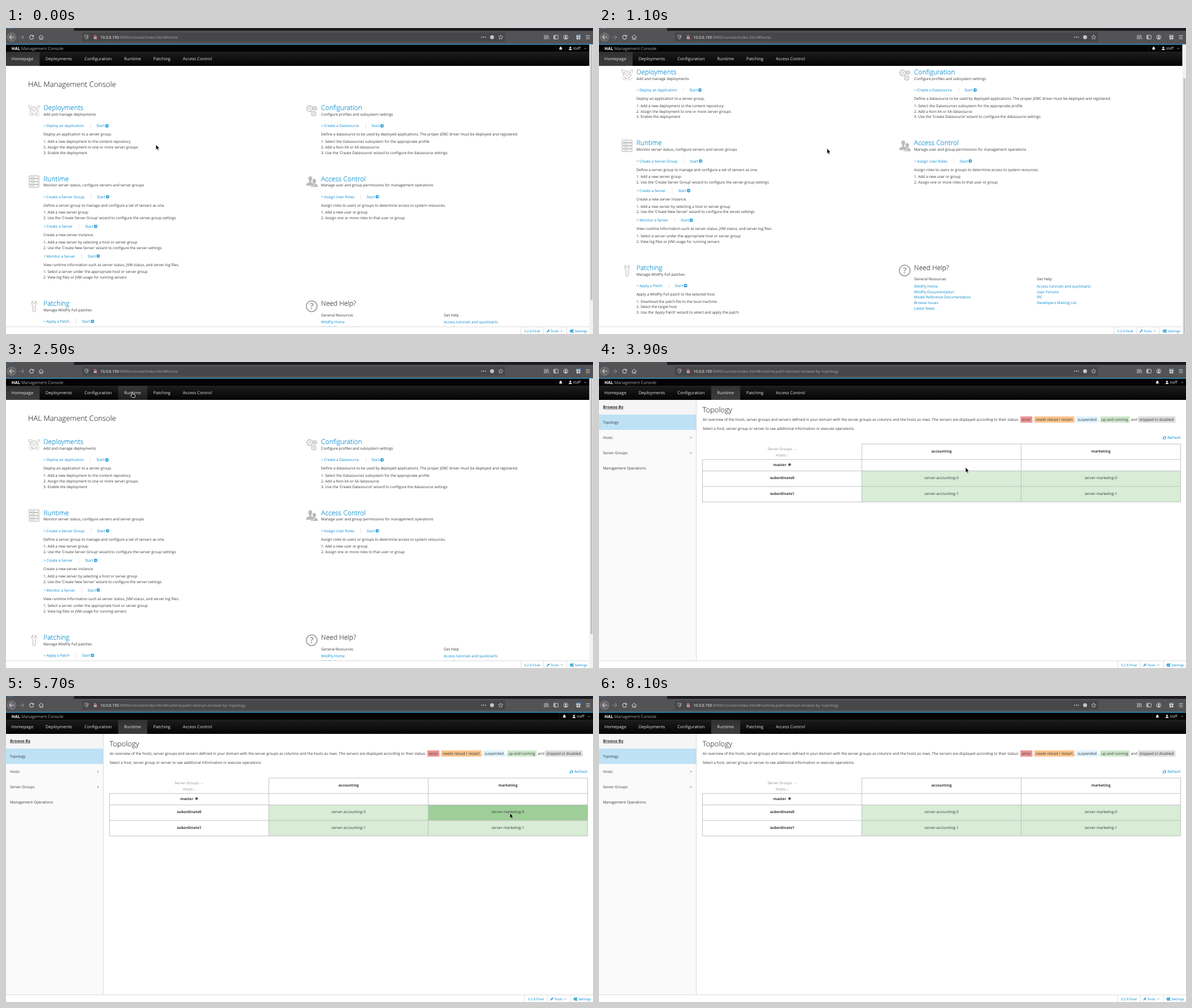
Write an HTML page that moves like this. It is 1035 by 541 pixels and loops after 8.5 s.

```html
<!DOCTYPE html>
<html lang="en">
<head>
<meta charset="utf-8">
<title>HAL Management Console</title>
<style>
  html, body { margin: 0; width: 100%; height: 100%; overflow: hidden; background: #fff; }
  svg { display: block; }
  text { font-family: "Open Sans", sans-serif; text-rendering: geometricPrecision; white-space: pre; }
</style>
</head>
<body>
<svg id="stage" width="1035" height="541" viewBox="0 0 1035 541"></svg>
<script>
const BODY = 6.515, SMALL = 5.95, NAV = 7.55, H1 = 13, H2 = 11.9;
const INK = '#363636', LINK = '#0088ce', GREY = '#a9a9a9', RULE = '#bbb', PALE = '#d7d7db', TOOLBAR = '#535355';

// Text is placed by its left edge (or anchor) and the middle of its capitals.
const text = (x, y, s, { size = BODY, fill = INK, weight = 400, anchor = 'start', more = '' } = {}) =>
  `<text x="${x}" y="${(y + size * .36).toFixed(2)}" font-size="${size}" fill="${fill}" font-weight="${weight}" text-anchor="${anchor}" ${more}>${s}</text>`;
const rect = (x, y, w, h, fill, more = '') =>
  `<rect x="${x}" y="${y}" width="${w}" height="${h}" fill="${fill}" ${more}/>`;
const line = (d, stroke, w = .8, more = '') =>
  `<path d="${d}" fill="none" stroke="${stroke}" stroke-width="${w}" ${more}/>`;
const shape = (d, fill, more = '') => `<path d="${d}" fill="${fill}" ${more}/>`;
const ring = (x, y, r, stroke, w = .8, more = '') =>
  `<circle cx="${x}" cy="${y}" r="${r}" fill="none" stroke="${stroke}" stroke-width="${w}" ${more}/>`;
const dot = (x, y, r, fill) => `<circle cx="${x}" cy="${y}" r="${r}" fill="${fill}"/>`;
const group = (id, body, more = '') => `<g id="${id}" ${more}>${body}</g>`;
const at = (x, y, body) => `<g transform="translate(${x} ${y})">${body}</g>`;
const title = (x, y, s, size, fill = INK) =>
  text(x, y, s, { size, fill, weight: 300, more: `stroke="${fill}" stroke-width=".14"` });
const gear = (x, y, r, c, w = .8) => ring(x, y, r, c, w) + ring(x, y, r * .4, c, w) +
  ring(x, y, r + w, c, w * 1.6, 'pathLength="16" stroke-dasharray="1"');
const star = (x, y, r) => {
  const p = Array.from({ length: 10 }, (_, i) => {
    const a = i * Math.PI / 5, q = i % 2 ? r * .42 : r;
    return `${(x + q * Math.sin(a)).toFixed(2)},${(y - q * Math.cos(a)).toFixed(2)}`;
  });
  return `M${p.join('L')}Z`;
};
const wrench = k => `<g transform="scale(${k})">` +
  '<path d="M-2.2-9.5V-5.6L0-4.4L2.2-5.6V-9.5Q5-7.6 4.4-4.4Q3.8-2.4 2-1.4V8Q2 10 0 10Q-2 10-2 8V-1.4Q-3.8-2.4-4.4-4.4Q-5-7.6-2.2-9.5Z"/></g>';
const chevDown = (x, y, c) => line(`M${x - 1.5} ${y - .8}l1.5 1.6l1.5-1.6`, c, .75);
const chevRight = (x, y, c) => line(`M${x - .7} ${y - 1.6}l1.6 1.6l-1.6 1.6`, c, .75);
const chevUp = (x, y, c) => line(`M${x - 1.5} ${y + .8}l1.5-1.6l1.5 1.6`, c, .75);

/* Home page */
const task = (x, y, label, startX, open, desc, steps) =>
  (open ? chevDown : chevRight)(x + 2, y, LINK) +
  text(x + 5.2, y, label, { fill: LINK }) +
  rect(startX - 10.7, y - 4.5, .6, 9, '#d1d1d1') +
  text(startX, y, 'Start', { fill: LINK }) +
  dot(startX + 18.6, y - .2, 2.9, LINK) +
  line(`M${startX + 16.7} ${y - .2}h3.2M${startX + 18.5} ${y - 2}l1.8 1.8l-1.8 1.8`, '#fff', .95) +
  text(x, y + 15, desc) +
  steps.map((s, i) => text(x, y + 27.6 + i * 9.75, `${i + 1}. ${s}`)).join('');
const head = (x, y, name, sub) => title(x, y, name, H2, LINK) + text(x, y + 11.7, sub);
const links = (x, list) => list.map((s, i) => text(x, 519.6 + i * 9.8, s, { fill: LINK })).join('');

const deployIcon = at(49.5, 146, ring(0, 0, 6.8, GREY, .8) +
  line('M-10-8.5L-5.5-9L-3.5-6.5M-10-8.5L-9-4L-6.5-3M10-8.5L5.5-8M10-8.5L9.5-4M-9.5 4L-6 9L-1 7.5M9.5 4L6.5 9.5L2 8M-8-7L5 6M8-7L-5 6M-6.5 2L0-5L6.5 2', GREY, .7));
const configIcon = gear(535.5, 142.5, 4.7, GREY) + gear(545, 142, 2.7, GREY, .7) + gear(542.5, 151.5, 3.6, GREY, .7);
const serverIcon = [0, 1, 2, 3].map(i =>
  rect(40.7, 261.2 + i * 5.3, 17.6, 4.6, '#fff', `rx=".8" stroke="${GREY}" stroke-width=".9"`) +
  line(`M43 ${263.5 + i * 5.3}h8M54.5 ${263.5 + i * 5.3}h2`, GREY, .7)).join('');
const person = 'M0-9Q3.8-9 3.8-4.8Q3.6-1.6 2 0V1.6Q7 3 7.5 5.5V8.5H-7.5V5.5Q-7 3-2 1.6V0Q-3.6-1.6-3.8-4.8Q-3.8-9 0-9Z';
const peopleIcon = at(543.5, 274.2, `<g transform="scale(.8)">${shape(person, '#b4b4b4')}</g>`) +
  at(536.5, 270.8, shape(person, '#bcbcbc', 'stroke="#fff" stroke-width=".8"'));
const helpIcon = ring(539, 492, 9.5, GREY, 2) +
  text(539, 492, '?', { size: 15, fill: GREY, weight: 700, anchor: 'middle' });

const home =
  title(39, 99, 'HAL Management Console', H1) +
  deployIcon + head(66, 141.2, 'Deployments', 'Add and manage deployments') +
  task(66, 173.1, 'Deploy an Application', 159.4, true, 'Deploy an application to a server group.',
    ['Add a new deployment to the content repository', 'Assign the deployment to one or more server groups', 'Enable the deployment']) +
  configIcon + head(555.6, 141.2, 'Configuration', 'Configure profiles and subsystem settings') +
  task(555.6, 173.1, 'Create a Datasource', 644.5, true,
    'Define a datasource to be used by deployed applications. The proper JDBC driver must be deployed and registered.',
    ['Select the Datasources subsystem for the appropriate profile', 'Add a Non-XA or XA datasource', "Use the 'Create Datasource' wizard to configure the datasource settings"]) +
  serverIcon + head(66, 266.4, 'Runtime', 'Monitor server status, configure servers and server groups') +
  task(66, 298.5, 'Create a Server Group', 160.6, true, 'Define a server group to manage and configure a set of servers as one.',
    ['Add a new server group', "Use the 'Create Server Group' wizard to configure the server group settings"]) +
  task(66, 350.9, 'Create a Server', 139.5, false, 'Create a new server instance.',
    ['Add a new server by selecting a host or server group', "Use the 'Create New Server' wizard to configure the server settings"]) +
  task(66, 403.3, 'Monitor a Server', 144, false, 'View runtime information such as server status, JVM status, and server log files.',
    ['Select a server under the appropriate host or server group', 'View log files or JVM usage for running servers']) +
  peopleIcon + head(555.6, 266.4, 'Access Control', 'Manage user and group permissions for management operations') +
  task(555.6, 298.5, 'Assign User Roles', 636, true, 'Assign roles to users or groups to determine access to system resources.',
    ['Add a new user or group', 'Assign one or more roles to that user or group']) +
  at(49.5, 492, `<g fill="none" stroke="${GREY}" stroke-width=".9">${wrench(1)}</g>`) +
  head(66, 486.7, 'Patching', 'Manage WildFly Full patches') +
  task(66, 518.8, 'Apply a Patch', 134, true, 'Apply a WildFly Full patch to the selected host.',
    ['Download the patch file to the local machine', 'Select the target host', "Use the 'Apply Patch' wizard to select and apply the patch"]) +
  helpIcon + title(555.6, 486.7, 'Need Help?', H2) +
  text(555.6, 507.3, 'General Resources') + text(772, 507.3, 'Get Help') +
  links(555.6, ['WildFly Home', 'WildFly Documentation', 'Model Reference Documentation', 'Browse Issues', 'Latest News']) +
  links(772, ['Access tutorials and quickstarts', 'User Forums', 'IRC', 'Developers Mailing List']);

/* Topology page */
const COLS = [182.5, 463.4, 744.4, 1025.5], ROWS = [145, 172.4, 192.6, 220, 247.4];
const mid = i => (COLS[i] + COLS[i + 1]) / 2;
const pill = (x, w, fill, tx, s) => rect(x, 96.2, w, 11, fill) + text(tx, 101.8, s);
const bold = { weight: 700, anchor: 'middle' }, centre = { anchor: 'middle' };
const soft = { anchor: 'middle', fill: '#8b8d8f' };

const side = rect(0, 67, 171.5, 461, '#fafafa') + rect(0, 67, 171.5, 26, '#f5f5f5') +
  rect(0, 93, 171.5, 27, '#bee1f4') + rect(171.2, 67, .8, 461, '#d1d1d1') +
  text(7, 79.2, 'Browse By', { size: 7, weight: 700, more: 'text-decoration="underline"' }) +
  ['Topology', 'Hosts', 'Server Groups', 'Management Operations'].map((s, i) => text(7, 106.5 + i * 27, s)).join('') +
  chevRight(162, 133.7, INK) + chevRight(162, 160.7, INK);

const legend =
  text(182.7, 101.8, 'An overview of the hosts, server groups and servers defined in your domain with the server groups as columns and the hosts as rows. The servers are displayed according to their status:', { size: 6.49 }) +
  pill(743, 21, '#ec9393', 746, 'error') + text(764.6, 101.8, ',') +
  pill(767.6, 70.6, '#f8c48c', 770, 'needs reload / restart') + text(838.6, 101.8, ',') +
  pill(841.6, 38.2, '#def3ff', 844, 'suspended') + text(880.4, 101.8, ',') +
  pill(883.6, 52, '#cfe7cd', 886, 'up and running') + text(937.4, 101.8, 'and') +
  pill(950.3, 66, '#dcdcdc', 953, 'stopped or disabled') + text(1016.8, 101.8, '.') +
  text(182.7, 118, 'Select a host, server group or server to see additional information or execute operations.');

const refresh = (x, y, r, c, w) =>
  line(`M${x - r} ${y - .3}A${r} ${r} 0 0 1 ${x + r * .8} ${y - r * .6}M${x + r} ${y + .3}A${r} ${r} 0 0 1 ${x - r * .8} ${y + r * .6}`, c, w) +
  shape(`M${x + r + .4} ${y - r}v2.4h-2.4zM${x - r - .4} ${y + r}v-2.4h2.4z`, c);

const table = rect(COLS[1], ROWS[2], COLS[3] - COLS[1], ROWS[4] - ROWS[2], '#d8ecd6') +
  rect(0, 0, 281, 27.4, '#9ecf99', 'id="cell"') +
  line(`M${COLS[1]} ${ROWS[0]}H${COLS[3]}` + ROWS.slice(1).map(y => `M${COLS[0]} ${y}H${COLS[3]}`).join('') +
    `M${COLS[0]} ${ROWS[1]}V${ROWS[4]}` + COLS.slice(1).map(x => `M${x} ${ROWS[0]}V${ROWS[4]}`).join(''), RULE, .9) +
  text(mid(0), 154, 'Server Groups →', soft) + text(mid(0), 164.5, 'Hosts ↓', soft) +
  text(307, 181.3, 'master', { weight: 700 }) + shape(star(336, 181.4, 3.4), INK) +
  ['accounting', 'marketing'].map((g, i) => text(mid(i + 1), 157.4, g, bold) +
    [0, 1].map(n => text(mid(i + 1), 205 + n * 27.4, `server-${g}-${n}`, centre)).join('')).join('') +
  [0, 1].map(n => text(mid(0), 205 + n * 27.4, `subordinate${n}`, bold)).join('');

const topology = rect(0, 67, 1035, 461, '#fff') + side + title(182.5, 84, 'Topology', H1) + legend +
  refresh(997, 134, 2.4, LINK, .9) + text(1002.3, 134, 'Refresh', { fill: LINK }) + table;

/* Browser bar */
const stroke = (d, c = PALE, w = .9) => line(d, c, w, 'stroke-linecap="round" stroke-linejoin="round"');
const url = { size: 6.81, fill: '#a3a3a6', more: 'style="font-family:\'Noto Sans\',sans-serif"' };
const address = s => text(166.3, 16.2, `<tspan fill="#f9f9fa">10.0.0.193</tspan>:9990/console/index.html#${s}`, url);
const bar = rect(0, 0, 1035, 6, '#1c1b1f') + rect(0, 0, 120, 6, TOOLBAR) + rect(4, 0, 8, 1, '#2f7cc0') +
  rect(0, 5, 1035, 23.5, TOOLBAR) + rect(134.3, 8, 746, 16.3, '#474749', 'rx="1.5"') +
  `<circle cx="10" cy="16.2" r="7.8" fill="#68686b" stroke="#8c8c8f" stroke-width=".6"/>` +
  stroke('M14 16.2H6.4M9.6 12.9L6.3 16.2L9.6 19.5', PALE, 1.1) +
  stroke('M23.8 16.2H31.4M28.2 12.9L31.5 16.2L28.2 19.5', '#87878a', 1.1) +
  stroke('M48 14.4A3.5 3.5 0 1 0 48.5 17.2', PALE, 1.1) + shape('M49.2 12v3.4h-3.4z', PALE) +
  stroke('M58 16.4L62 12.4L66 16.4M59.3 16V19.9H64.7V16M62 19.8V17.6', PALE, 1) +
  stroke('M142 12.4L145.2 13.4Q145.2 18.2 142 20Q138.8 18.2 138.8 13.4Z', '#b8b8bb') + shape('M142 14v4.4q1.6-1.4 1.6-4z', '#b8b8bb') +
  rect(155, 15.6, 5, 3.9, '#b8b8bb', 'rx=".5"') + stroke('M156 15.4V14Q157.5 11.6 159 14V15.4', '#b8b8bb') + stroke('M154.3 12.6L160.8 19.8', '#ff3b55', 1) +
  [838.8, 842, 845.2].map(x => dot(x, 16.2, 1, '#c4c4c6')).join('') +
  dot(857, 16.2, 3.5, '#c4c4c6') +
  `<path d="${star(872.2, 16.4, 4.3)}" fill="none" stroke="#c4c4c6" stroke-width=".8"/>` +
  stroke('M949.3 12.8V19.6M951.5 12.8V19.6M953.7 12.8V19.6M955.4 13L957 19.6') +
  rect(965.7, 12.9, 7.8, 6.6, 'none', `rx=".9" stroke="${PALE}" stroke-width=".9"`) + rect(966, 13.2, 3, 6, PALE, 'opacity=".65"') +
  ring(987, 16.2, 3.8, PALE, .9) + dot(987, 15.2, 1.5, PALE) + shape('M984.4 18.6q2.6-2.8 5.2 0q-2.6 2-5.2 0z', PALE) +
  rect(1005.4, 13.8, 7.6, 2.2, PALE) + rect(1006, 16.6, 6.4, 3.6, PALE) + rect(1008.8, 13.8, .9, 6.4, TOOLBAR) +
  stroke('M1009.2 13.6Q1006.5 10.6 1006.4 13.2M1009.2 13.6Q1011.8 10.6 1012 13.2') + dot(1012.6, 12.4, 1.3, '#0a84ff') +
  stroke('M1023 13.4h6M1023 16.2h6M1023 19h6') +
  group('urlHome', address('home')) + group('urlTopo', address('runtime;path=domain-browse-by~topology'));

/* Console header and footer */
const TABS = [0, 59.3, 128, 197.8, 249, 301, 375];
const NAMES = ['Homepage', 'Deployments', 'Configuration', 'Runtime', 'Patching', 'Access Control'];
const NAMEX = [9.6, 69.8, 138.3, 208.3, 259.7, 311.7];
const tab = (id, fill) => rect(0, 42.2, 10, 24.8, fill, `id="${id}"`);
const header = rect(0, 28, 1035, 14.2, '#030303') + rect(0, 28.1, 1035, 1.4, '#39a5dc') +
  rect(0, 42, 1035, 25, 'url(#nav)') + rect(0, 42, 1035, .5, '#2b2b2b') +
  tab('hover', 'url(#glow)') + tab('active', 'url(#lit)') +
  text(9.8, 36, 'HAL', { size: NAV, fill: '#fff', weight: 700 }) +
  text(27, 36, 'Management Console', { size: NAV, fill: '#fff', weight: 300 }) +
  NAMES.map((s, i) => text(NAMEX[i], 54.6, s, { size: NAV, fill: '#e4e4e4' })).join('') +
  group('user', rect(969, 30, .5, 12, '#2b2b2b') + rect(986.3, 30, .5, 12, '#2b2b2b') +
    shape('M978 33q2 .2 2 2.8q.2 1.6 1 2.2h-6q.8-.6 1-2.2q0-2.6 2-2.8zM977.2 38.4h1.6q-.8 1.2-1.6 0z', '#e4e4e4') +
    dot(995, 34.6, 1.6, '#e4e4e4') + shape('M992.2 39q0-2.6 2.8-2.6t2.8 2.6z', '#e4e4e4') +
    text(999.8, 36.1, 'staff', { fill: '#e4e4e4' }) + chevDown(1021.3, 36.3, '#e4e4e4'));
const foot = { size: SMALL, fill: LINK };
const footer = rect(0, 528, 1035, 13, '#fff') + rect(0, 527.8, 1035, .8, '#d1d1d1') +
  group('tools', [907.5, 947.5, 988.3].map(x => rect(x, 528.5, .7, 13, '#d1d1d1')).join('') +
    text(913.5, 535.6, '3.2.9.Final', foot) +
    at(956, 535.6, `<g fill="${LINK}" transform="rotate(45)">${wrench(.33)}</g>`) +
    text(960.2, 535.6, 'Tools', foot) + chevUp(979.8, 535.6, LINK) +
    gear(996.6, 535.8, 1.5, LINK, .8) + gear(999.6, 534, .7, LINK, .5) + gear(999.6, 537.6, .7, LINK, .5) +
    text(1003, 535.6, 'Settings', foot));

const edge = 'fill="#000" stroke="#fff" stroke-linejoin="round"';
const arrow = `<path id="arrow" ${edge} stroke-width=".6" d="M0 0V9.2L2.1 7.3L3.5 10.4L5 9.8L3.7 6.7H6.3Z"/>`;
const hand = `<path id="hand" ${edge} stroke-width=".9" d="M-.9.8Q0-.7.9.8V3.8L4.6 4.6Q5.7 5 5.5 6.2L4.8 9.6H.2L-2.6 6.3Q-2.4 5-.9 6Z"/>`;
const fade = (id, top, bottom) =>
  `<linearGradient id="${id}" x2="0" y2="1"><stop stop-color="${top}"/><stop offset="1" stop-color="${bottom}"/></linearGradient>`;

document.getElementById('stage').innerHTML =
  `<defs>${fade('nav', '#1d1d1d', '#030303')}${fade('lit', '#323232', '#3c3c3c')}${fade('glow', '#363636', '#1d1d1d')}</defs>` +
  rect(0, 0, 1035, 541, '#fff') + group('home', home) + group('topology', topology) + bar + header + footer +
  group('scrollbar', rect(1028.5, 29.2, 6.5, 511.8, '#f2f2f2') + rect(1030.4, 29.2, 3.8, 452, '#c4c4c4', 'id="thumb"')) +
  group('cursor', arrow + hand);

/* Motion: [ms, x, y] for the pointer, [ms, y] for the page */
const POINTER = [
  [0, 264.3, 206], [300, 264.3, 206], [900, 396, 211], [1100, 402, 213], [1200, 403, 214],
  [1500, 390, 190], [2100, 160, 50], [2500, 222.3, 53], [3200, 222.3, 53], [3900, 646.3, 186.3],
  [4000, 342, 207], [4200, 342, 207], [4700, 604, 209], [4800, 604, 209], [5100, 614, 238],
  [5500, 888, 238], [5600, 888, 238], [5700, 888.5, 207], [5800, 888.5, 207], [6500, 560.4, 246],
  [6600, 470, 253], [6700, 386, 240], [7300, 185, 56], [7600, 160, 53], [8000, 46, 0]
];
const SCROLL = [[0, 0], [600, 0], [800, 40], [1000, 63.2], [1200, 63.2], [1400, 23], [1600, 0]];
const LOOP = 8500, TICK = 100, OPEN = 3200, GONE = 8100;

const tween = (keys, t) => {
  const i = keys.findIndex(k => k[0] > t);
  if (i < 0) return keys[keys.length - 1].slice(1);
  const a = keys[i - 1], b = keys[i], f = (t - a[0]) / (b[0] - a[0]);
  return a.slice(1).map((v, j) => v + (b[j + 1] - v) * f);
};
const el = id => document.getElementById(id);
const show = (id, on) => el(id).setAttribute('display', on ? 'inline' : 'none');
const move = (id, x, y) => el(id).setAttribute('transform', `translate(${x} ${y})`);
const setTab = (id, i) => {
  show(id, i >= 0);
  if (i < 0) return;
  el(id).setAttribute('x', TABS[i]);
  el(id).setAttribute('width', TABS[i + 1] - TABS[i]);
};

function draw(t) {
  const topo = t >= OPEN, seen = t < GONE;
  const [x, y] = tween(POINTER, t), [scroll] = tween(SCROLL, t);
  ['home', 'urlHome', 'scrollbar'].forEach(id => show(id, !topo));
  ['topology', 'urlTopo'].forEach(id => show(id, topo));
  move('home', 0, -scroll);
  move('thumb', 0, scroll * .945);
  move('user', topo ? 6.5 : 0, 0);
  move('tools', topo ? 6.5 : 0, 0);

  const overNav = seen && y > 42 && y < 67 && x < 375;
  setTab('active', topo ? 3 : 0);
  setTab('hover', overNav ? TABS.findIndex(v => v > x) - 1 : -1);
  const overCell = seen && x > COLS[1] && x < COLS[3] && y > ROWS[2] && y < ROWS[4];
  show('cell', overCell);
  if (overCell) move('cell', COLS[x < COLS[2] ? 1 : 2], ROWS[y < ROWS[3] ? 2 : 3]);

  show('cursor', seen);
  show('hand', overNav);
  show('arrow', !overNav);
  move('cursor', x, y);
}

const begin = performance.now();
function frame() {
  const t = (performance.now() - begin) % LOOP;
  draw(Math.floor(t / TICK) * TICK);
  requestAnimationFrame(frame);
}
frame();
</script>
</body>
</html>
```
